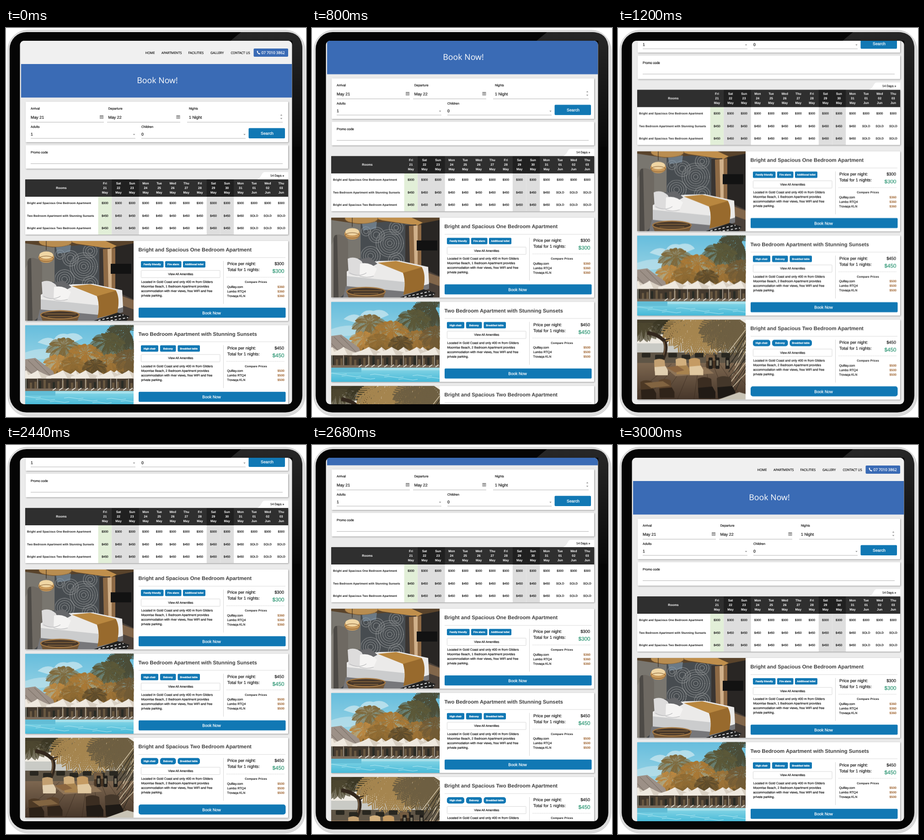
An HTML page that plays this animation: 656 by 853 pixels, repeating every 3.64 s.

```html
<!DOCTYPE html>
<html lang="en">
<head>
<meta charset="utf-8">
<title>Apartment booking</title>
<style>
  html, body { margin: 0; width: 100%; height: 100%; overflow: hidden; background: #fff; }
  svg { display: block; width: 656px; height: 853px; font-family: "Liberation Sans", Arial, sans-serif; text-rendering: geometricPrecision; }
  text { fill: #1c1c1c; white-space: pre; }
  .b { font-weight: bold; }
  .w { fill: #fff; }
  .m { text-anchor: middle; }
  .e { text-anchor: end; }
  .k { stroke: #1c1c1c; stroke-width: .22; }
  .kw { stroke: #fff; stroke-width: .25; }
  .nav { font-family: "Open Sans", "Noto Sans", sans-serif; }
  .title { fill: #3d3d3d; }
  .green { fill: #2b9572; stroke: #2b9572; stroke-width: .2; }
  .brown { fill: #9c602b; }
  .card { fill: #fff; filter: drop-shadow(1px 1.5px 1.5px rgba(0,0,0,.38)); }
</style>
</head>
<body>
<svg id="stage" viewBox="0 0 656 853"></svg>
<script>
const BLUE = '#1178b4', BAND = '#3a6bb5';
const range = n => [...Array(n).keys()];

const rect = (x, y, w, h, fill, r = 0, extra = '') =>
  `<rect x="${x}" y="${y}" width="${w}" height="${h}" rx="${r}" fill="${fill}" ${extra}/>`;
const card = (x, y, w, h) => `<rect class="card" x="${x}" y="${y}" width="${w}" height="${h}" rx="1"/>`;
const shape = (d, fill, extra = '') => `<path d="${d}" fill="${fill}" ${extra}/>`;
const line = (d, stroke, width = 1, extra = '') =>
  `<path d="${d}" fill="none" stroke="${stroke}" stroke-width="${width}" ${extra}/>`;
const oval = (x, y, rx, ry, fill, extra = '') =>
  `<ellipse cx="${x}" cy="${y}" rx="${rx}" ry="${ry}" fill="${fill}" ${extra}/>`;
// y is the middle of the capitals
const text = (x, y, size, str, cls = '') =>
  `<text x="${x}" y="${(y + size * .36).toFixed(2)}" font-size="${size}" class="${cls}">${str}</text>`;
const gradient = (id, stops, dir = 'x2="0" y2="1"') =>
  `<linearGradient id="${id}" ${dir}>${stops.map(([o, c]) => `<stop offset="${o}" stop-color="${c}"/>`).join('')}</linearGradient>`;

// A crown of arching fronds, each a spine with drooping leaflets.
const palm = (x, y, r, color, from = 0, to = 360, n = 9) => range(n).map(i => {
  const a = (from + (to - from) * (i + .5) / n) * Math.PI / 180;
  const cx = Math.cos(a) * r, cy = Math.sin(a) * r * .7;
  const at = s => [x + cx * s, y + cy * s + r * (.55 * s * s - .3 * s)];
  const leaves = range(14).map(j => {
    const s = (j + 1) / 14, [px, py] = at(s), size = r * .34 * Math.sin(.4 + 2.4 * s);
    return [-.8, .8].map(turn => `M${px.toFixed(1)} ${py.toFixed(1)}l${(size * Math.cos(a + turn)).toFixed(1)} ${(size * (Math.sin(a + turn) + .5)).toFixed(1)}`).join('');
  }).join('');
  const spine = 'M' + range(7).map(j => at(j / 6).map(v => v.toFixed(1)).join(' ')).join('L');
  return line(spine + leaves, color, r / 28);
}).join('');

const bedroom = () => {
  const rings = [[128, 56, 30], [99, 38, 17], [86, 84, 21], [142, 22, 15], [142, 94, 17], [76, 30, 10]];
  return rect(0, 0, 237, 175, 'url(#wall)') +
    shape('M0 0H64V90H38L0 60Z', '#79766f') +
    rect(65, 8, 97, 100, '#474c50') +
    `<g clip-path="url(#art)">` + rings.map(([x, y, r]) =>
      range(Math.floor(r / 5)).map(i => oval(x, y, r - i * 5, r - i * 5, 'none',
        'stroke="#8f9293" stroke-width="1.8" stroke-dasharray="1.8 1.2"')).join('')).join('') + '</g>' +
    shape('M0 0H237V7L192 17 120 9 60 14 0 5Z', '#59432b') +
    shape('M92 0H176L200 11 188 17 112 6Z', '#c08f4c') +
    shape('M66 6L100 9 98 24 70 28Z', '#8ba0b2', 'opacity=".55"') +
    shape('M162 16L186 15V118L162 103Z', '#3a3532') +
    shape('M170 18L197 16V112L172 103Z', '#8e6a45') +
    shape('M180 18L189 17V106L182 103Z', '#d0b08a') +
    shape('M197 13L237 5V145L197 112Z', '#292624') +
    rect(187, 50, 45, 22, '#121212') +
    shape('M197 110L237 128V175H197Z', '#4a4039') +
    shape('M204 118L237 130V150L208 140Z', '#82664a') +
    shape('M0 60L8 46V175H0Z', '#85817a') +
    shape('M5 46Q7 36 18 37L31 41Q36 44 37 54V160L20 175H5Z', '#6e6962') +
    shape('M5 46Q7 36 13 38L16 175H5Z', '#4d4a46') +
    shape('M34 118L66 100 104 95 148 94 212 108 214 146 160 160 34 152Z', '#ebeae9') +
    shape('M34 128L160 141V164L34 157Z', '#cbcccd') +
    shape('M32 150L160 162 214 145V156L160 175H26Z', '#77777a') +
    shape('M102 99L142 95 198 108Q208 124 201 158L158 169Q164 142 157 121Z', '#b9873f') +
    shape('M157 121L198 109Q208 126 201 158L158 169Q164 142 157 121Z', '#986a2d') +
    shape('M58 92L84 87 101 101 92 106 72 101Z', '#66676a') +
    shape('M36 90Q52 83 67 96L77 121Q59 131 38 123Z', '#dddcdc') +
    shape('M63 101Q84 96 100 112L93 128Q75 134 62 128Z', '#f5f4f3') +
    line('M40 121Q60 132 77 121M62 128Q78 133 93 128', '#b9b9bb', 1.2) +
    shape('M150 175L202 157 228 165 222 175Z', '#222') +
    line('M160 174L215 162M178 176L225 168', '#ddd', 2, 'stroke-dasharray="5 4"') +
    shape('M33 162Q75 178 119 162L114 175H38Z', '#715638') +
    oval(76, 162, 42, 9, '#46372a', 'stroke="#a67a45" stroke-width="2.4"') +
    line('M42 160H111M49 166H103', '#8d693e', 1.3) +
    oval(66, 2, 36, 11, '#b98d50') +
    oval(66, 2, 36, 11, 'none', 'stroke="#7a572e" stroke-width="2" stroke-dasharray="1 2"') +
    line('M46 0V20', '#2b2119') + oval(46, 36, 17, 12, '#c99a5c') +
    oval(46, 31, 15, 8, '#f0d6a4') + oval(46, 39, 16, 6, 'none', 'stroke="#7b542b"');
};

const pool = () => {
  const umbrella = ([x, w]) =>
    shape(`M${x - w} 113Q${x - w * .35} 107 ${x} 99Q${x + w * .35} 107 ${x + w} 113V117H${x - w}Z`, '#efe9df') +
    shape(`M${x} 99Q${x + w * .35} 107 ${x + w} 113V117H${x + w * .3}Z`, '#d8cfc2') + line(`M${x} 117V146`, '#cfc6b8', 1.2);
  return rect(0, 0, 237, 175, 'url(#sky)') +
    shape('M27 38Q45 22 63 31 72 15 92 20 115 13 126 29L95 42 50 45Z', '#d8edf2', 'opacity=".65"') +
    shape('M0 60Q40 45 75 58L60 73 0 77Z', '#c7e5ed', 'opacity=".6"') +
    shape('M50 112Q62 88 82 92 105 80 128 90 155 78 179 88 210 72 237 80V116H50Z', '#71592f') +
    line('M82 112Q78 84 86 50M132 112Q140 86 132 60M178 112Q176 70 182 40M214 112Q226 62 230 22', '#6f5a40', 3) +
    palm(228, 14, 52, '#4b4d38', 80, 300, 9) + palm(180, 36, 38, '#5b5838') +
    palm(84, 46, 36, '#7f6a3d') + palm(130, 62, 40, '#a87835') +
    palm(70, 80, 30, '#b98640', 0, 360, 8) + palm(104, 84, 28, '#8d6a33') +
    palm(187, 80, 34, '#9c7236') + palm(228, 70, 34, '#715b36') + palm(152, 88, 26, '#5c4b2c') +
    shape('M0 75L22 72 61 101 66 115H0Z', '#9c9087') +
    line('M6 77L44 114M20 75L58 114M0 91L22 114', '#81766c', 1.2) +
    rect(0, 114, 237, 32, '#43392e') +
    range(24).map(i => rect(i * 10, 119 + i * 7 % 9, 5, 19, i % 3 ? '#685740' : '#292b25')).join('') +
    [[2, 24], [110, 22], [158, 26], [200, 24], [27, 30], [82, 36], [132, 32], [187, 32], [226, 30]].map(umbrella).join('') +
    rect(0, 139, 237, 6, '#7a6c5c') +
    range(13).map(i => line(`M${60 + i * 14} 143L${67 + i * 14} 138`, '#e8e3da', 1.6)).join('') +
    rect(0, 144.5, 237, 31, 'url(#water)') +
    rect(0, 144.5, 66, 10, '#62bdd6') + rect(66, 145, 171, 5, '#a5e1ec') +
    range(8).map(i => line(`M${i * 31 - 8} ${158 + i * 5 % 13}q10 -3 21 0t21 0`, '#b9eaf3', .9)).join('');
};

const terrace = () => {
  const chair = (x, y, s, top, seat) => `<g transform="translate(${x} ${y}) scale(${s})">` +
    shape('M0 3Q11 -3 23 3L25 27H1Z', top) + shape('M1 18L25 16 30 25V36H2Z', seat) + '</g>';
  return rect(0, 0, 237, 175, '#efebe3') +
    rect(0, 52, 237, 24, '#c9cac5') + rect(0, 72, 237, 26, '#5f5546') +
    rect(0, 95, 237, 80, 'url(#deck)') +
    range(9).map(i => line(`M${i * 36 - 20} 175L${75 + i * 15} 97`, '#37291e', .9, 'opacity=".7"')).join('') +
    shape('M0 0H84L62 14 40 9 20 22 0 24Z', '#443e2b') +
    palm(14, 8, 38, '#4d4730', 0, 180, 6) + palm(72, 0, 38, '#3b3724', 0, 180, 6) +
    line('M53 93Q68 64 59 46 43 31 22 29M59 49Q82 37 80 9', '#33271d', 8) +
    line('M54 86Q64 66 58 48', '#725b42', 2.4) +
    palm(140, -8, 82, '#a5854f', 5, 175, 9) +
    palm(216, -4, 76, '#6e5f42', 45, 185, 7) +
    range(13).map(i => line(`M237 ${22 + i * 8}L${193 + i % 4 * 7} ${80 + i * 7}`, i % 3 ? '#302c23' : '#d6c7a9', 1.4)).join('') +
    range(7).map(i => rect(10 + i * 29, 73 + i % 2 * 4, 19, 10, '#292720', 2)).join('') +
    shape('M60 104H150L168 118 84 124Z', '#8f7558') +
    chair(37, 86, 1, '#c3a071', '#e2d0b1') + chair(84, 84, 1, '#d2b07e', '#a8834f') +
    chair(113, 84, 1.05, '#c59b63', '#e0c8a0') + chair(150, 76, .85, '#745c41', '#463423') +
    shape('M65 105L88 101 103 111 83 116Z', '#8c6640') +
    [156, 171, 193].map(x => rect(x, 83, 9, 25, '#211e1a', 2) + rect(x + 2, 89, 5, 12, '#77705e')).join('') +
    chair(7, 133, 1.15, '#4d3925', '#2c2118') + chair(47, 130, 1.15, '#5e452d', '#30241a') +
    shape('M15 139L56 135 72 145 31 150Z', '#826441') +
    chair(132, 126, 1.3, '#3b2d21', '#211b16') + chair(174, 124, 1.35, '#44372a', '#1d1915') +
    shape('M178 175L223 159 237 163V175Z', '#c8c3b5');
};

const header = () => rect(33, 20, 592, 59, '#f0f0f0') +
  [[304.5, 'HOME'], [340, 'APARTMENTS'], [398.5, 'FACILITIES'], [447, 'GALLERY'], [491.5, 'CONTACT US']]
    .map(([x, s]) => text(x, 54.2, 7.05, s, 'nav k')).join('') +
  rect(541.5, 45, 75.5, 18, BAND, 2) +
  line('M549.6 51.2Q550 55.6 554.3 57', '#fff', 1.7) +
  line('M548.8 51.6L551 51M553.6 57.4L554.9 55.3', '#fff', 2.3) +
  text(558.5, 54.2, 8.2, '07 7010 3862', 'nav w kw') +
  rect(33, 79, 592, 73.5, BAND) +
  text(331, 115, 17.8, 'Book Now!', 'nav w m');

const calendar = x => rect(x, 191.5, 8, 7.5, '#8a8a8a') +
  range(6).map(i => rect(x + .8 + i % 3 * 2.4, 193.8 + Math.floor(i / 3) * 2.4, 1.5, 1.5, '#fff')).join('');
const caret = (x, y, dir) => shape(`M${x - 2.3} ${y - dir}h4.6l-2.3 ${2.4 * dir}z`, '#888');

const field = (x, y, label, value, lineX, width) =>
  text(x, y, 7, label, 'k') + text(x, y + (y < 200 ? 19 : 16.5), 8.9, value, 'k') +
  rect(lineX, y + (y < 200 ? 29.5 : 25.5), width, 1, '#b5b5b5');

const form = () => card(43, 161.5, 574, 89) + card(43, 257, 574, 51.5) +
  field(54, 176.5, 'Arrival', 'May 21', 54, 160) + field(223.5, 176.5, 'Departure', 'May 22', 221, 160) +
  field(400, 176.5, 'Nights', '1 Night', 396, 209) +
  field(54, 216, 'Adults', '1', 54, 229) + field(296, 216, 'Children', '0', 296, 228) +
  calendar(205) + calendar(372.5) + caret(602, 191, -1) + caret(602, 198.5, 1) + caret(280, 233.5, 1) + caret(521.5, 233.5, 1) +
  rect(530.5, 219.5, 79.5, 22.5, BLUE, 2) + text(571, 230.7, 8.8, 'Search', 'w m kw') +
  text(54, 272.5, 7, 'Promo code', 'k') + rect(54, 297, 551, 1, '#b5b5b5');

const rooms = ['Bright and Spacious One Bedroom Apartment', 'Two Bedroom Apartment with Stunning Sunsets', 'Bright and Spacious Two Bedroom Apartment'];

const table = () => {
  const days = ['Fri', 'Sat', 'Sun', 'Mon', 'Tue', 'Wed', 'Thu'];
  const rows = [383.3, 411.7, 438.3];
  const left = i => 201.6 + 29.65 * i;
  const columns = range(14).map(i => {
    const x = left(i) + 14.8, weekend = i % 7 === 1 || i % 7 === 2;
    const june = i > 10, date = june ? '0' + (i - 10) : 21 + i;
    return (weekend ? rect(left(i), 332, 29.75, 38, '#202020') + rect(left(i), 370, 29.75, 83, '#dedede') : '') +
      [days[i % 7], date, june ? 'Jun' : 'May'].map((s, j) => text(x, 341 + j * 9.8, 6.9, s, 'b w m')).join('') +
      rows.map((y, r) => text(x, y, 6.5, r === 0 ? '$300' : june ? 'SOLD' : '$450', 'm k')).join('');
  }).join('');
  return card(42, 332, 575, 121) +
    shape('M549 332Q555 330 560 320 562 316 566 316H617V332Z', '#fff') + text(578, 323.8, 6.7, '14 Days »', 'k') +
    rect(42, 332, 575, 38, '#2f2f2f') + text(121, 351, 6.9, 'Rooms', 'b w m') +
    rect(left(0), 370, 29.65, 83, '#e2efd8') + columns +
    rooms.map((s, i) => text(46, rows[i], 6.42, s, 'b')).join('');
};

const familyTags = [[295, 49.5, 'Family friendly'], [348, 35.5, 'Fire alarm'], [387, 49, 'Additional toilet']];
const basicTags = [[295, 38, 'High chair'], [337, 34.5, 'Balcony'], [375.5, 48.5, 'Breakfast table']];

const apartment = (i, photo, tags, price, rival, radius) => {
  const beds = i ? 2 : 1;
  const about = ['Located in Gold Coast and only 400 m from Gliders', `Moonrise Beach, ${beds} Bedroom Apartment provides`,
    'accommodation with river views, free WiFi and free', 'private parking.'];
  return `<g transform="translate(0 ${184.5 * i})">` + card(42, 467, 575, 175.5) +
    `<g transform="translate(42 467)" clip-path="url(#photo)">${photo()}</g>` +
    text(289.5, 486.4, 11.33, rooms[i], 'b title') +
    line('M290 503.5H611', '#dcdcdc') +
    tags.map(([x, w, s]) => rect(x, 511.3, w, 13.9, BLUE, radius) + text(x + w / 2, 518.4, 5.4, s, 'b w m kw')).join('') +
    rect(295.5, 531.5, 172.5, 16, '#fff', 1, 'stroke="#d8d8d8"') + text(382, 539.5, 6.8, 'View All Amenities', 'm k') +
    about.map((s, j) => text(295.5, 557 + j * 9.9, 6.9, s, 'k')).join('') +
    line('M475.5 511V605', '#d5d5d5') +
    text(484, 516.8, 9.3, 'Price per night:', 'k') + text(608, 516.8, 9.4, price, 'e k') +
    text(484, 530, 9.3, 'Total for 1 nights:', 'k') + text(608.5, 533, 11.7, price, 'e green') +
    line('M482 546.5H609', '#cfcfcf', 1, 'stroke-dasharray="1.5 1"') +
    text(546.5, 557, 6.4, 'Compare Prices', 'b m') +
    ['Quillay.com', 'Lumbo RTQ4', 'Trovaqa KLN'].map((s, j) =>
      text(483.5, 567.3 + j * 10, 6.8, s, 'k') + text(609, 567.3 + j * 10, 7, rival, 'e b brown')).join('') +
    rect(290, 613.2, 321.5, 22, BLUE, radius) + text(449.5, 624.4, 8.9, 'Book Now', 'w m kw') + '</g>';
};

document.getElementById('stage').innerHTML = `<defs>
  ${gradient('rim', [[0, '#dcdcdc'], [.5, '#e9e9e9'], [1, '#dadada']], 'x2="1" y2="0"')}
  ${gradient('gloss', [[0, '#272727'], [1, '#080808']])}
  ${gradient('wall', [[0, '#585c60'], [1, '#45484b']])}
  ${gradient('sky', [[0, '#66bddd'], [.6, '#a5d9e6'], [1, '#bfe0e5']])}
  ${gradient('water', [[0, '#8ad7e6'], [1, '#46b9d8']])}
  ${gradient('deck', [[0, '#7d6750'], [1, '#46362a']])}
  <clipPath id="screen"><rect x="30.5" y="28" width="595" height="797" rx="9"/></clipPath>
  <clipPath id="photo"><rect width="237.5" height="175.5"/></clipPath>
  <clipPath id="art"><rect x="65" y="8" width="97" height="100"/></clipPath>
  </defs>` +
  rect(4, 4.5, 650, 846.5, 'url(#rim)', 44, 'stroke="#cdcdcd"') +
  rect(8, 9, 640, 834, '#050505', 37) +
  shape('M514 9H611Q648 9 648 46V260H626V28H491Z', 'url(#gloss)') +
  `<g clip-path="url(#screen)">${rect(30, 28, 597, 798, '#ebebeb')}<g id="page">` +
  header() + form() + table() +
  apartment(0, bedroom, familyTags, '$300', '$360', 2) +
  apartment(1, pool, basicTags, '$450', '$500', 2) +
  apartment(2, terrace, basicTags, '$450', '$500', 5) + '</g></g>';

// Symmetric ease, cubic-bezier(.33, 0, .67, 1)
const ease = x => {
  let lo = 0, hi = 1;
  for (let i = 0; i < 30; i++) {
    const t = (lo + hi) / 2, u = 1 - t;
    if (.99 * t * u * u + 2.01 * t * t * u + t ** 3 < x) lo = t; else hi = t;
  }
  return lo * lo * (3 - 2 * lo);
};

const LOOP = 3640, TICK = 40, STEPS = 15, DISTANCE = 196.5;
const pose = (time, progress) => ({
  offset: time / LOOP, easing: 'steps(1, end)', transform: `translateY(${-DISTANCE * progress}px)`
});
const scroll = (start, progress) => range(STEPS).map(i => pose(start + TICK * i, progress(ease((i + 1) / STEPS))));

document.getElementById('page').animate(
  [pose(0, 0), ...scroll(640, p => p), ...scroll(2440, p => 1 - p), pose(LOOP, 0)],
  { duration: LOOP, iterations: Infinity });
</script>
</body>
</html>
```
